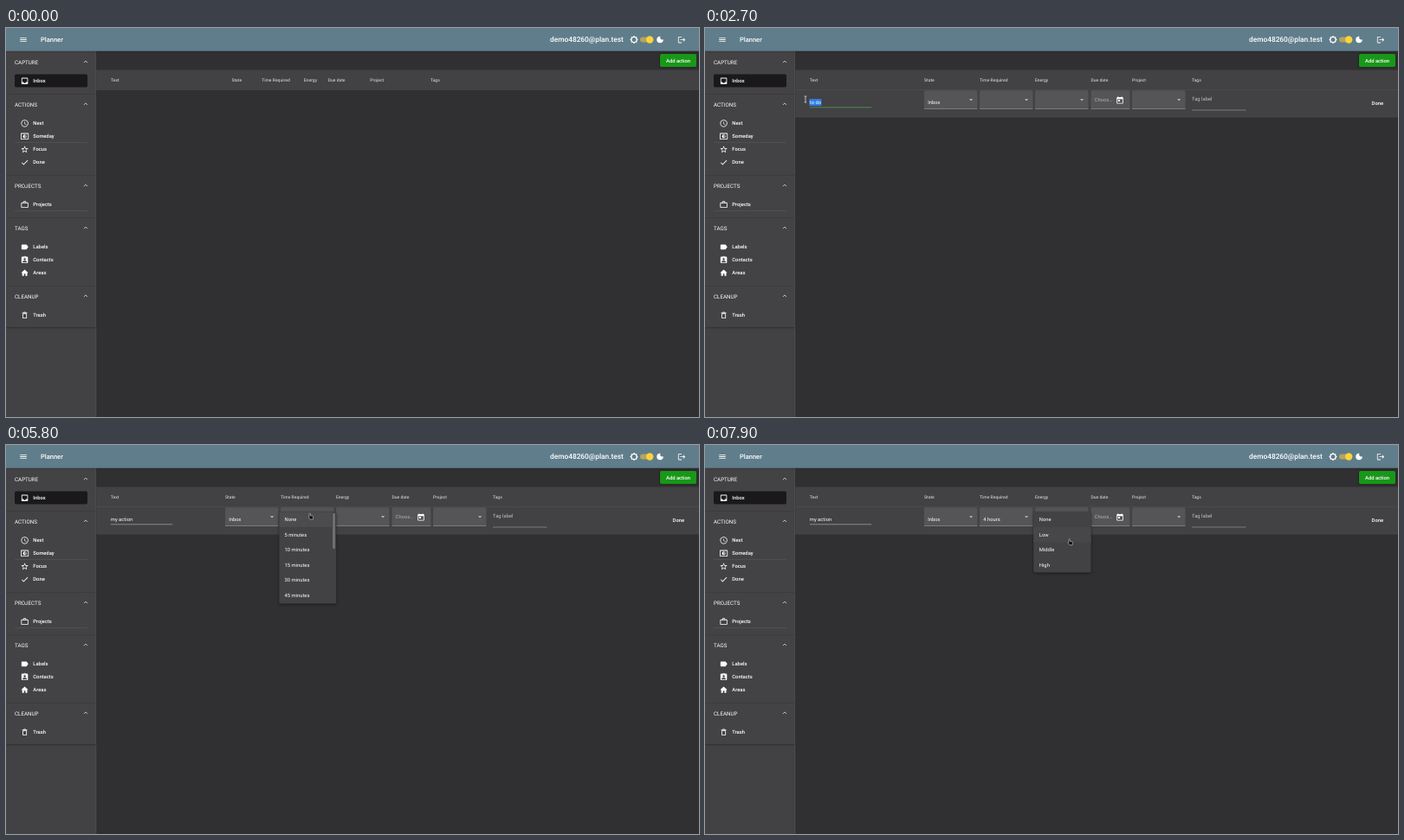
Recreate the animation shown at these times as an HTML page. Size 800 by 450 pixels, loop 8 s.

```html
<!DOCTYPE html>
<html lang="en">
<head>
<meta charset="utf-8">
<title>Planner</title>
<style>
  html, body { margin: 0; width: 100%; height: 100%; overflow: hidden; background: #302f31; }
  svg { display: block; width: 800px; height: 450px; }
  text { font-family: Roboto, sans-serif; white-space: pre; text-rendering: geometricPrecision; }
  .panel { filter: drop-shadow(0 1px 1.5px rgba(0, 0, 0, .45)); }
  .bar { filter: drop-shadow(0 .8px 1px rgba(0, 0, 0, .4)); }
</style>
</head>
<body>
<svg id="stage" viewBox="0 0 800 450"></svg>
<script>
const ICONS = {
  menu: 'M3 18h18v-2H3zm0-5h18v-2H3zm0-7v2h18V6z',
  inbox: 'M19 3H5c-1.1 0-2 .9-2 2v14c0 1.1.9 2 2 2h14c1.1 0 2-.9 2-2V5c0-1.1-.9-2-2-2zm0 12h-4c0 1.66-1.35 3-3 3s-3-1.34-3-3H5V5h14z',
  clock: 'M12 2a10 10 0 1 0 0 20a10 10 0 1 0 0-20zm0 18a8 8 0 1 1 0-16a8 8 0 1 1 0 16zm.5-13H11v6l5.25 3.15.75-1.23-4.5-2.67z',
  someday: 'M21 3H3c-1.1 0-2 .9-2 2v14c0 1.1.9 2 2 2h18c1.1 0 2-.9 2-2V5c0-1.1-.9-2-2-2zm0 16H3V5h18zM8 16h2.5l1.5 1.5 1.5-1.5H16v-2.5l1.5-1.5-1.5-1.5V8h-2.5L12 6.5 10.5 8H8v2.5L6.5 12 8 13.5zm4-7c1.66 0 3 1.34 3 3s-1.34 3-3 3z',
  star: 'M22 9.24l-7.19-.62L12 2 9.19 8.63 2 9.24l5.46 4.73L5.82 21 12 17.27 18.18 21l-1.63-7.03zM12 15.4l-3.76 2.27 1-4.28-3.32-2.88 4.38-.38L12 6.1l1.71 4.04 4.38.38-3.32 2.88 1 4.28z',
  done: 'M9 16.2L4.8 12l-1.4 1.4L9 19 21 7l-1.4-1.4z',
  work: 'M14 6V4h-4v2zM4 8v11h16V8zm16-2c1.1 0 2 .9 2 2v11c0 1.1-.9 2-2 2H4c-1.1 0-2-.9-2-2V8c0-1.1.9-2 2-2h4V4c0-1.1.9-2 2-2h4c1.1 0 2 .9 2 2v2z',
  label: 'M17.63 5.84C17.27 5.33 16.67 5 16 5H5c-1.1 0-2 .9-2 2v10c0 1.1.9 2 2 2h11c.67 0 1.27-.33 1.63-.84L22 12z',
  contact: 'M19 3h-4.18a3 3 0 0 0-5.64 0H5c-1.1 0-2 .9-2 2v14c0 1.1.9 2 2 2h14c1.1 0 2-.9 2-2V5c0-1.1-.9-2-2-2zm-7 0a1 1 0 0 1 0 2a1 1 0 0 1 0-2zm0 4a3 3 0 0 1 0 6a3 3 0 0 1 0-6zm6 12H6v-1.4c0-2 4-3.1 6-3.1s6 1.1 6 3.1z',
  home: 'M10 20v-6h4v6h5v-8h3L12 3 2 12h3v8z',
  trash: 'M6 19c0 1.1.9 2 2 2h8c1.1 0 2-.9 2-2V7H6zM8 9h8v10H8zm7.5-5l-1-1h-5l-1 1H5v2h14V4z',
  sun: 'M20 15.31L23.31 12 20 8.69V4h-4.69L12 .69 8.69 4H4v4.69L.69 12 4 15.31V20h4.69L12 23.31 15.31 20H20zM12 18a6 6 0 1 1 0-12a6 6 0 1 1 0 12z',
  moon: 'M12 3a9 9 0 1 0 9 9c0-.46-.04-.92-.1-1.36a5.39 5.39 0 0 1-7.54-7.54c-.44-.06-.9-.1-1.36-.1z',
  logout: 'M17 7l-1.41 1.41L18.17 11H8v2h10.17l-2.58 2.58L17 17l5-5zM4 5h8V3H4c-1.1 0-2 .9-2 2v14c0 1.1.9 2 2 2h8v-2H4z',
  calendar: 'M19 3h-1V1h-2v2H8V1H6v2H5c-1.1 0-2 .9-2 2v14c0 1.1.9 2 2 2h14c1.1 0 2-.9 2-2V5c0-1.1-.9-2-2-2zm0 16H5V8h14zM7 10h5v5H7z'
};
const POINTERS = {
  arrow: 'M0 0V6.8l1.5-1.4 1.1 2.4 1.1-.5-1.1-2.3h2z',
  hand: 'M.1.8C.1-.2 1.5-.2 1.5.8V2.8l2.4.5c.7.2.9.6.8 1.2L4.2 7.3H1.4L-.6 4.9c-.3-.6.2-1 .7-.7z',
  beam: 'M-1.3 0H1.3M-1.3 7H1.3M0 0V7'
};
const PANEL = '#424143', DIM = 'rgba(255,255,255,.7)';
const ROW = 17.5, LIST_TOP = 77.5, MAX_SCROLL = 138.25, CHOSEN = 10;
const TIMES = ['None', '5 minutes', '10 minutes', '15 minutes', '30 minutes', '45 minutes', '1 hour',
  '90 minutes', '2 hours', '3 hours', '4 hours', '6 hours', '8 hours', 'whoa nelly!'];
const ENERGIES = ['None', 'Low', 'Middle', 'High'];

const rect = (x, y, w, h, fill, r = 0, extra = '') =>
  `<rect x="${x}" y="${y}" width="${w}" height="${h}" rx="${r}" fill="${fill}" ${extra}/>`;
const text = (x, mid, str, fill = '#fff', weight = 400, size = 5.83, id = '') =>
  `<text x="${x}" y="${mid + size * .36}" fill="${fill}" font-weight="${weight}" font-size="${size}" ${id && `id="${id}"`}>${str}</text>`;
const icon = (name, x, y, size = 10) =>
  `<path d="${ICONS[name]}" fill="#fff" fill-rule="evenodd" transform="translate(${x - size / 2} ${y - size / 2}) scale(${size / 24})"/>`;
const group = (id, body, cls = '') => `<g id="${id}" class="${cls}">${body}</g>`;

function toolbar() {
  return rect(0, 0, 800, 26.7, '#607d8b', 0, 'class="bar"') + icon('menu', 20, 13.5) +
    text(40, 13.3, 'Planner', '#fff', 500, 7.5) + text(628, 13.3, 'demo48260@plan.test', '#fff', 500, 8.33) +
    icon('sun', 725, 13.5) + rect(732, 10.6, 15, 5.8, '#b5a45c', 2.9) +
    '<circle cx="743.2" cy="13.5" r="4.2" fill="#fbd33c"/>' + icon('moon', 755, 13.5) + icon('logout', 780, 13.7);
}

function sidebar() {
  const sections = [
    ['CAPTURE', 40, 76, [['inbox', 'Inbox', 61]]],
    ['ACTIONS', 88.8, 170, [['clock', 'Next', 110], ['someday', 'Someday', 125], ['star', 'Focus', 140.2], ['done', 'Done', 155.2]]],
    ['PROJECTS', 183, 219, [['work', 'Projects', 204]]],
    ['TAGS', 232, 298, [['label', 'Labels', 253], ['contact', 'Contacts', 268], ['home', 'Areas', 283]]],
    ['CLEANUP', 310.8, 346.5, [['trash', 'Trash', 332]]]
  ];
  let out = rect(0, 26, 104, 424, PANEL) + rect(0, 26, 104, 320.5, '#434244', 0, 'class="bar"') +
    rect(103.6, 26, .6, 424, '#59585a') + rect(10, 53.5, 84, 15, '#1a181b', 1.7) +
    rect(10, 132.2, 84, .5, '#5d5c5e') + rect(10, 211.4, 84, .5, '#5d5c5e');
  for (const [title, y, end, items] of sections) {
    out += text(10, y, title, '#fff', 400, 6.25) + rect(0, end, 104, .5, 'rgba(0,0,0,.2)') +
      `<path d="M90 ${y + .1}l2-2 2 2" fill="none" stroke="#ddd" stroke-width=".85"/>`;
    for (const [name, label, mid] of items) out += icon(name, 21.6, mid + .3) + text(31.3, mid, label, '#fff', 500);
  }
  return out;
}

const headers = xs => ['Text', 'State', 'Time Required', 'Energy', 'Due date', 'Project', 'Tags']
  .map((name, i) => text(xs[i], 60, name, DIM, 500, 5)).join('');

const field = (x, w, body) =>
  rect(x, 72.3, w, 21.7, '#555456', 1.7) + rect(x, 93.4, w, .6, '#98979a') + body;
const select = (x, body = '') =>
  field(x, 61.5, body + `<path d="M${x + 52} 82.2h4.2l-2.1 2.1z" fill="#c6c5c7"/>`);

function editRow() {
  return headers([120.8, 253, 317, 381, 445.5, 493, 562]) + rect(104.2, 71.6, 696, 31.4, PANEL) +
    rect(104.2, 71.4, 696, .5, '#5a595b') + rect(104.2, 102.8, 696, .5, '#4b4a4c') +
    rect(120.8, 91.5, 71.4, .7, '#a9a8aa', 0, 'id="underline"') +
    rect(120.5, 82, 14, 8, '#2f7be0', 0, 'id="selection"') + text(120.8, 85.6, '', '#fff', 400, 5.83, 'entry') +
    select(253, text(257.2, 86, 'Inbox')) + select(317, text(321.3, 86, '4 hours', '#fff', 400, 5.83, 'timeValue')) +
    select(381) + field(445.5, 45, text(449.6, 83, 'Choos…', '#b0afb1') + icon('calendar', 479, 83.8)) +
    select(493) + text(562, 82, 'Tag label', '#c0bfc1') + rect(562, 94.7, 62.4, .6, '#a09fa1') +
    text(769.6, 87, 'Done', '#fff', 500);
}

const options = (names, x) => names.map((name, i) => text(x, LIST_TOP + 8.6 + i * ROW, name)).join('');

stage.innerHTML =
  '<clipPath id="listClip"><rect x="315.4" y="77.2" width="65.8" height="106.4" rx="1.7"/></clipPath>' +
  rect(0, 0, 800, 450, '#302f31') + sidebar() + rect(104.2, 48.5, 696, 23, PANEL) +
  group('idleHead', headers([121, 260.4, 295.2, 343.8, 371.7, 420.3, 490]) + rect(104.2, 71.2, 696, .5, '#4e4d4f')) +
  group('edit', editRow()) + toolbar() +
  rect(755, 30, 42, 15, '#189718', 1.7, 'id="button" class="bar"') + text(762, 37.6, 'Add action', '#fff', 500) +
  group('timePanel', rect(315.4, 77.2, 65.8, 106.4, PANEL, 1.7) +
    '<g clip-path="url(#listClip)">' +
    group('timeList', rect(315.4, LIST_TOP, 61, ROW, '#4c4b4d', 0, 'id="timeHover"') + options(TIMES, 321.5)) + '</g>' +
    rect(377.2, 79, 2.6, 41, '#757476', 1, 'id="thumb"'), 'panel') +
  group('energyPanel', rect(379.2, 77.2, 66.4, 70.2, PANEL, 1.7) +
    rect(379.2, LIST_TOP, 66.4, ROW, '#474648', 0, 'id="energyHover"') + options(ENERGIES, 385.8), 'panel') +
  '<path id="pointer" fill="#111" stroke="#ddd" stroke-width=".55"/>';

const el = id => document.getElementById(id);
const show = (id, on) => el(id).setAttribute('opacity', +on);
const set = (id, name, value) => el(id).setAttribute(name, value);
const clamp = v => Math.max(0, Math.min(1, v));
const smooth = v => { v = clamp(v); return v * v * (3 - 2 * v); };

// time, x, y of the pointer tip
const PATH = [
  [100, 784, 36.5], [300, 731, 124], [400, 731, 124], [700, 752, 70], [900, 763, 42], [1200, 762.7, 37.2], [1500, 762.7, 37.2],
  [1700, 640, 95], [1900, 390, 122], [2200, 139, 86], [2300, 134, 84], [2600, 116, 79], [3800, 116, 79],
  [3900, 135, 110], [4100, 225, 245], [4300, 318, 150], [4400, 335.2, 122.8], [4900, 335.2, 122.8],
  [5400, 350, 78.8], [5900, 350, 78.8], [6500, 352, 131], [6600, 349, 125], [6700, 347, 121.6], [6800, 347, 121.6],
  [7000, 380, 112.8], [7300, 412, 86], [7500, 416, 88], [7700, 422, 99], [7900, 419.8, 108.5]
];
function pointerAt(t) {
  const i = Math.max(1, PATH.findIndex(p => p[0] >= t));
  const [a, b] = [PATH[i - 1], PATH[i]];
  const k = clamp((t - a[0]) / (b[0] - a[0]));
  return [a[1] + (b[1] - a[1]) * k, a[2] + (b[2] - a[2]) * k];
}

// start time and typed text
const ENTRY = [[1300, 'to do'], [3100, 'm'], [3200, 'my'], [3400, 'my a'], [3500, 'my ac'], [3600, 'my acti'], [3700, 'my action']];

function draw(t) {
  const [x, y] = pointerAt(t);
  const onButton = x > 755 && y < 45 && t >= 500;
  const onField = t >= 5000 && y > 72 && y < 94 && (x > 317 && x < 378 || x > 381 && x < 442);
  const inList = t >= 5700 && t < 6900 || t >= 7400;
  const shape = t >= 2200 && t < 3000 ? 'beam' : onButton || onField || inList ? 'hand' : 'arrow';
  set('pointer', 'd', POINTERS[shape]);
  set('pointer', 'stroke-width', shape === 'beam' ? .8 : .55);
  set('pointer', 'transform', `translate(${x} ${y})`);
  show('pointer', t >= 100 && !(t >= 3000 && t < 3900));
  set('button', 'fill', onButton ? '#2ca32f' : '#189718');

  show('idleHead', t < 1300);
  show('edit', t >= 1300);
  el('entry').textContent = (ENTRY.filter(e => e[0] <= t).pop() || ['', ''])[1];
  const selected = t < 3100 ? 14 * clamp((t - 2200) / 400) : 0;
  set('selection', 'x', 134.5 - selected);
  set('selection', 'width', selected);
  set('underline', 'fill', t < 2300 || t >= 4800 ? '#a9a8aa' : t < 4400 ? '#4caf50' : '#7a9a8c');

  const scroll = MAX_SCROLL * smooth((t - 5900) / 550);
  const hovered = s => Math.floor((y - LIST_TOP + s) / ROW);
  const picked = t >= 6900;
  show('timePanel', t < 5700 || t >= 7100 ? 0 : t < 5800 ? .6 : t < 7000 ? 1 : .5);
  set('timeList', 'transform', `translate(0 ${-scroll})`);
  set('timeHover', 'y', LIST_TOP + ROW * (picked ? CHOSEN : hovered(scroll)));
  el('timeList').querySelectorAll('text')[CHOSEN].setAttribute('opacity', picked ? .15 : 1);
  set('thumb', 'y', 79 + 62 * scroll / MAX_SCROLL);
  show('timeValue', picked);

  show('energyPanel', t < 7400 ? 0 : t < 7500 ? .6 : 1);
  set('energyHover', 'y', LIST_TOP + ROW * Math.max(0, hovered(0)));
}

const start = performance.now();
function tick() {
  draw(Math.floor((performance.now() - start) % 8000 / 100) * 100);
  requestAnimationFrame(tick);
}
tick();
</script>
</body>
</html>
```
